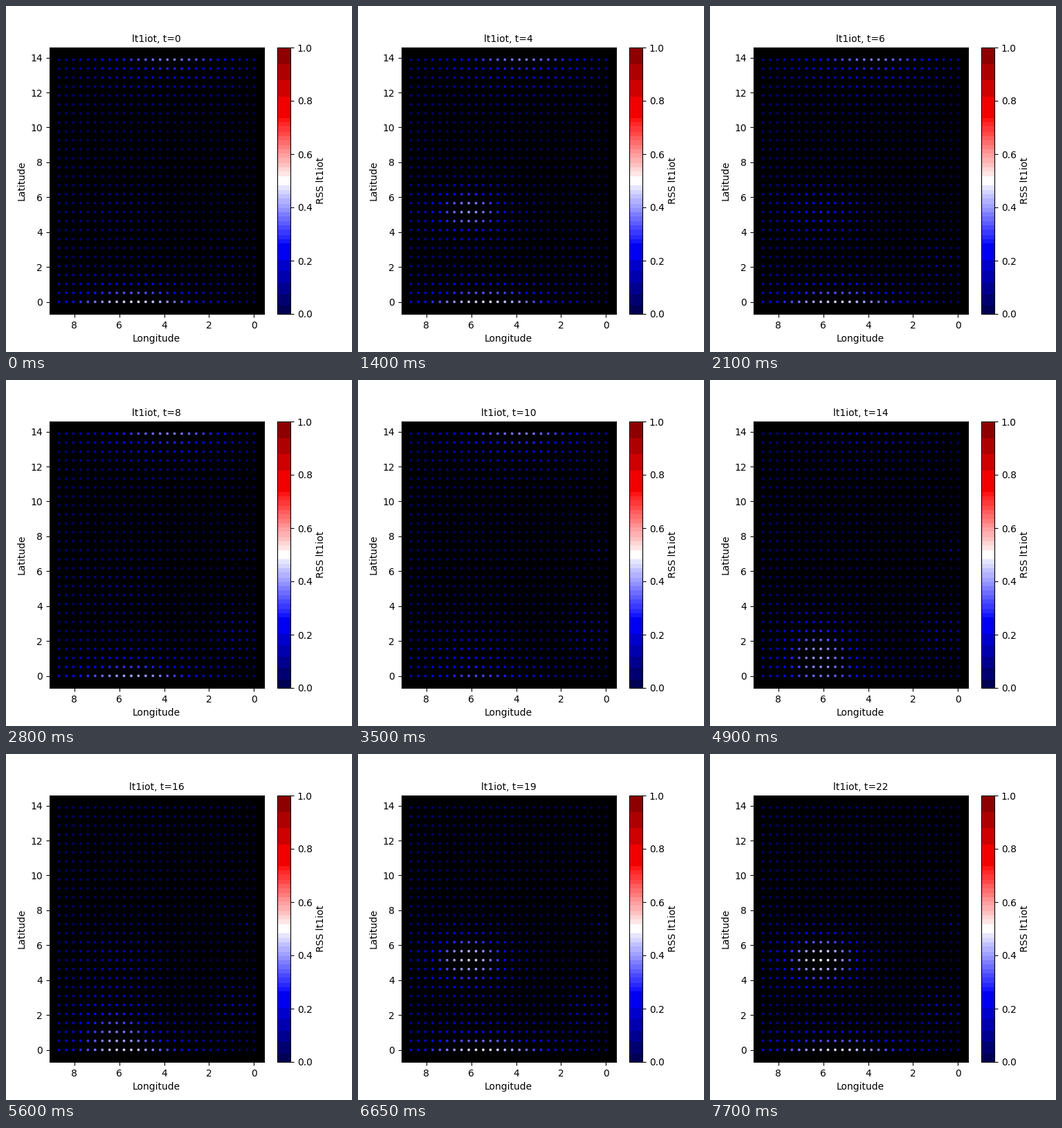
These frames come from a looping animation (500 by 500 pixels, 8 s). A matplotlib script:

```python
import numpy as np
import matplotlib.pyplot as plt
from matplotlib.animation import FuncAnimation
from matplotlib.cm import ScalarMappable
from matplotlib.colors import ListedColormap

STEP_MS, TICK_MS, LOOP_MS = 350, 50, 8000
NAME = "lt1iot"
WIDTH, HEIGHT, COUNT = 8.68, 13.885, 28

X, Y = (g.ravel() for g in np.meshgrid(np.linspace(0, WIDTH, COUNT),
                                       np.linspace(0, HEIGHT, COUNT)))


def bump(cx, cy, sx, sy):
    return np.exp(-(((X - cx) / sx) ** 2 + ((Y - cy) / sy) ** 2) / 2)


def edge_bump(cx, cy, sx, sy):
    """Bump centred one spread outside the grid, reaching 1 at the border."""
    return np.exp(0.5) * bump(cx, cy, sx, sy)


def ramp(t, start, end):
    u = np.clip((t - start) / (end - start), 0, 1)
    return u * u * (3 - 2 * u)


def pulse(t, centre, width):
    return np.exp(-((t - centre) / width) ** 2)


FLOOR = 0.01 + 0.04 * X / WIDTH
BOTTOM = edge_bump(5.25, -1.6, 2.35, 1.6)
TOP = edge_bump(3.7, HEIGHT + 2, 2.4, 2)
MIDDLE = bump(6.05, 5.2, 1.35, 1.1)
CORNER = bump(6.2, 1.5, 1.3, 1.4)
RIGHT = bump(0.7, 2.4, 0.85, 1)
SPOT = bump(0.32, 7.2, 0.25, 0.5)


def field(t):
    """Signal level of every grid point at step t."""
    return (FLOOR
            + BOTTOM * (0.43 - 0.33 * pulse(t, 12.5, 3.5))
            + TOP * (0.34 - 0.32 * ramp(t, 10, 17))
            + MIDDLE * (0.36 * pulse(t, 4, 3) + 0.45 * ramp(t, 14, 20))
            + CORNER * 0.32 * pulse(t, 13.8, 3.6)
            + RIGHT * (0.05 + 0.09 * ramp(t, 4, 9))
            + SPOT * (0.01 + 0.09 * ramp(t, 5, 10)))


def banded(cmap):
    """Flatten a colour map into wide outer bands and narrow inner ones."""
    inner = np.linspace(0.265, 0.483, 14)
    edges = np.concatenate([[0], np.linspace(0.031, 0.203, 5), inner,
                            1 - inner[::-1], np.linspace(0.816, 0.938, 3), [1]])
    v = (np.arange(256) + 0.5) / 256
    band = np.digitize(v, edges) - 1
    return ListedColormap(cmap((edges[band] + edges[band + 1]) / 2))


fig, ax = plt.subplots(figsize=(5, 5), dpi=100)
ax.set_facecolor("black")
dots = ax.scatter(X, Y, c=field(0), s=3, cmap="seismic", vmin=0, vmax=1)
ax.invert_xaxis()
ax.set_xlabel("Longitude")
ax.set_ylabel("Latitude")
title = ax.set_title("", fontsize=10)
fig.colorbar(ScalarMappable(cmap=banded(plt.get_cmap("seismic"))), ax=ax,
             label=f"RSS {NAME}")


def update(i):
    t = i * TICK_MS // STEP_MS
    dots.set_array(field(t))
    title.set_text(f"{NAME}, t={t}")
    return dots, title


anim = FuncAnimation(fig, update, frames=LOOP_MS // TICK_MS,
                     interval=TICK_MS, repeat=True, repeat_delay=0)
plt.show()
```
